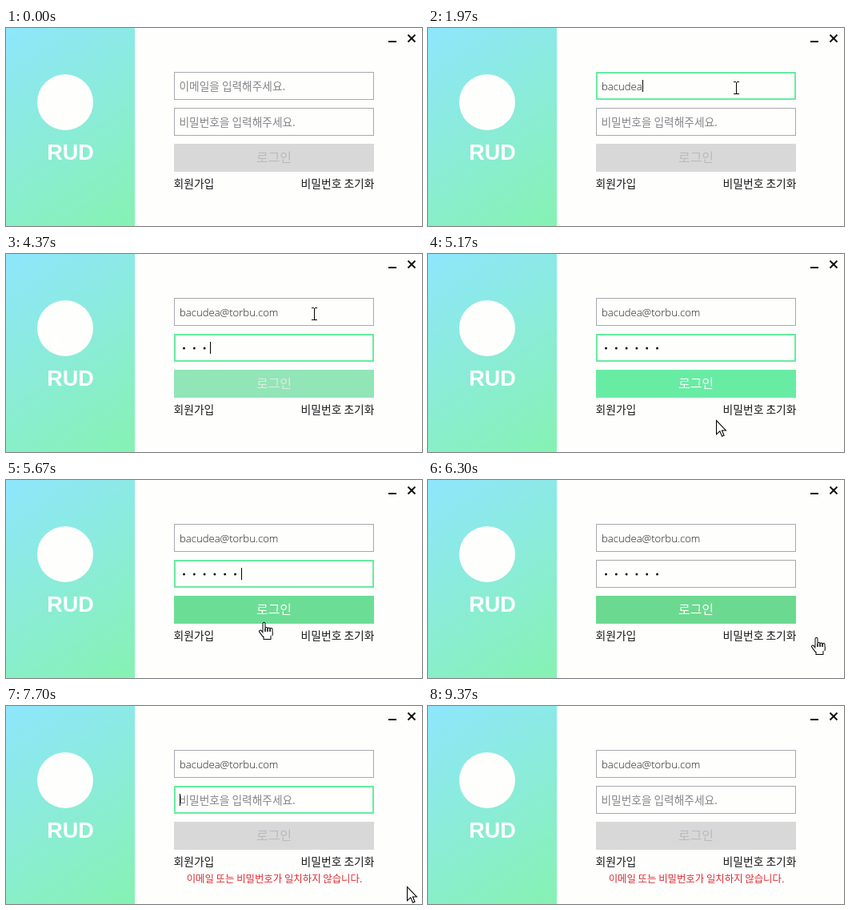
Write an HTML page with a canvas that moves like this. It is 520 by 248 pixels and loops after 9.41 s.

```html
<!DOCTYPE html>
<html lang="ko">
<head>
<meta charset="utf-8">
<style>
html, body { margin: 0; width: 520px; height: 248px; overflow: hidden; background: #fefefd; }
canvas { display: block; }
</style>
</head>
<body>
<canvas id="stage" width="520" height="248"></canvas>
<script>
const LOOP = 9410;
const ctx = document.getElementById('stage').getContext('2d');
const KO = '"Noto Sans CJK KR", "Noto Sans CJK", sans-serif';
const LATIN = '"Open Sans", "Noto Sans", sans-serif';
const EMAIL = 'bacudea@torbu.com';
const PAPER = '#fefefd', INK = '#1a1a1c';
const BLINK = 530;
const FOCUS_EMAIL = 470, FOCUS_PASS = 3340, SUBMIT = 6000, REPLY = 6630, LEAVE = 8900, BLUR = 9370;

const range = (n, start, step) => Array.from({ length: n }, (_, i) => start + i * step);
const emailKeys = [...range(6, 1400, 86), 1970, ...range(10, 2500, 80)];
const passKeys = range(6, 4200, 80);

// pointer legs: begin, end, and where each one arrives
const ENTRY = { x: 493, y: 187 };
const legs = [
  { from: 30, to: 470, x: 385, y: 75 },
  { from: 5000, to: 5170, x: 360, y: 208 },
  { from: 5170, to: 5300, x: 351, y: 217 },
  { from: 5300, to: 5830, x: 310, y: 161 },
  { from: 6200, to: 6300, x: 485, y: 197 },
  { from: 6300, to: 6470, x: 501, y: 226 }
];

const colors = {
  fill: { off: [216, 216, 217], on: [104, 236, 164], hover: [108, 217, 144] },
  text: { off: [186, 186, 190], on: [255, 255, 250], hover: [255, 255, 250] }
};

const clamp = v => Math.max(0, Math.min(1, v));
const mix = (a, b, k) => a + (b - a) * k;
const easeOut = (t, start, dur, power) => 1 - (1 - clamp((t - start) / dur)) ** power;
const blend = (a, b, k) => a.map((v, i) => mix(v, b[i], k));
const inside = (p, y) => p.x >= 210 && p.x < 460 && p.y >= y && p.y < y + 35;
const typedCount = (keys, t) => keys.filter(k => k <= t).length;

function text(str, x, y, size, color, align = 'left', family = KO) {
  ctx.font = `350 ${size}px ${family}`;
  ctx.textAlign = align;
  ctx.fillStyle = color;
  ctx.fillText(str, x, y);
}

function line(x0, y0, x1, y1, color, width) {
  ctx.beginPath();
  ctx.moveTo(x0, y0);
  ctx.lineTo(x1, y1);
  ctx.strokeStyle = color;
  ctx.lineWidth = width;
  ctx.stroke();
}

function dot(x, y, r, color) {
  ctx.beginPath();
  ctx.arc(x, y, r, 0, Math.PI * 2);
  ctx.fillStyle = color;
  ctx.fill();
}

function panel() {
  const g = ctx.createLinearGradient(0, 0, 161, 248);
  g.addColorStop(0, '#8ee6fc');
  g.addColorStop(1, '#86f2b2');
  ctx.fillStyle = g;
  ctx.fillRect(0, 0, 161, 248);
  dot(74, 93, 35, PAPER);
  ctx.font = 'bold 27px "Liberation Sans", Arial, sans-serif';
  ctx.textAlign = 'center';
  ctx.fillText('RUD', 80.5, 165);
}

function windowButtons() {
  ctx.fillStyle = '#111';
  ctx.fillRect(478, 16, 10, 2);
  line(502.5, 8.5, 511.5, 17.5, '#111', 2);
  line(511.5, 8.5, 502.5, 17.5, '#111', 2);
}

function field(y, focused, hint) {
  const width = focused ? 2 : 1;
  ctx.strokeStyle = focused ? '#66eca0' : '#a9a9ae';
  ctx.lineWidth = width;
  ctx.strokeRect(210 + width / 2, y + width / 2, 250 - width, 35 - width);
  if (hint) text(hint, 216.5, y + 23, 13.7, '#85858a');
}

// The caret restarts its blink at the latest key or focus time.
function caret(t, x, y, resets) {
  const last = Math.max(...resets.filter(k => k <= t));
  if (Math.floor((t - last) / BLINK) % 2) return;
  ctx.fillStyle = '#000';
  ctx.fillRect(Math.round(x), y, 1, 15);
}

function emailField(t) {
  const focused = t >= FOCUS_EMAIL && t < FOCUS_PASS;
  const typed = EMAIL.slice(0, typedCount(emailKeys, t));
  field(55, focused, typed ? '' : '이메일을 입력해주세요.');
  text(typed, 217, 78, 13.1, INK, 'left', LATIN);
  if (focused) caret(t, 217 + ctx.measureText(typed).width, 65, [FOCUS_EMAIL, ...emailKeys]);
}

function passField(t) {
  const focused = (t >= FOCUS_PASS && t < SUBMIT) || (t >= REPLY && t < BLUR);
  const count = t < REPLY ? typedCount(passKeys, t) : 0;
  field(100, focused, count ? '' : '비밀번호을 입력해주세요.');
  for (let i = 0; i < count; i++) dot(222.5 + i * 12.8, 118, 1.5, '#111');
  if (focused) caret(t, 217 + count * 12.8, 110, [FOCUS_PASS, ...passKeys, REPLY]);
}

function loginButton(t) {
  const shade = ({ off, on, hover }) => {
    const lit = blend(off, on, easeOut(t, passKeys[0], 430, 2));
    const hovered = blend(lit, hover, easeOut(t, 5500, 330, 2));
    const c = blend(hovered, off, easeOut(t, REPLY, 400, 4));
    return `rgb(${c.map(Math.round)})`;
  };
  ctx.fillStyle = shade(colors.fill);
  ctx.fillRect(210, 145, 250, 35);
  text('로그인', 335, 168, 16, shade(colors.text), 'center');
}

function pointerAt(t) {
  return legs.reduce((p, leg) => {
    const k = clamp((t - leg.from) / (leg.to - leg.from));
    return { x: mix(p.x, leg.x, k), y: mix(p.y, leg.y, k) };
  }, ENTRY);
}

function arrow() {
  ctx.scale(1.08, 1.08);
  ctx.fillStyle = '#fff';
  ctx.strokeStyle = '#000';
  ctx.lineWidth = 1;
  const outline = new Path2D('M.5 .5V16.5L4.5 12.8L7 18.8L9.3 17.8L6.9 12H11.5Z');
  ctx.fill(outline);
  ctx.stroke(outline);
}

function beam() {
  ctx.fillStyle = '#000';
  ctx.fillRect(0, -7, 1, 15);
  for (const y of [-8, 7]) {
    ctx.fillRect(-3, y, 3, 1);
    ctx.fillRect(1, y, 3, 1);
  }
}

function hand() {
  ctx.lineCap = 'round';
  for (const [color, edge] of [['#000', 1], ['#fff', 0]]) {
    const limb = (...ends) => line(...ends, color, 2 + 2 * edge);
    limb(0.5, 2, 0.5, 15);
    limb(-4, 11.5, 0, 17);
    for (let i = 1; i < 4; i++) limb(0.5 + 3 * i, 7.5 + i / 2, 0.5 + 3 * i, 15);
    ctx.fillStyle = color;
    ctx.fillRect(-0.5 - edge, 12, 11 + 2 * edge, 5);
    ctx.fillRect(0.5 - edge, 16, 8 + 2 * edge, 5 + edge);
  }
  ctx.lineCap = 'butt';
  for (let i = 0; i < 3; i++) line(2 + 3 * i, 8, 2 + 3 * i, 12, '#000', 1);
}

function pointer(t) {
  if (t < 30 || t >= LEAVE) return;
  const p = pointerAt(t);
  const busy = t >= SUBMIT && t < REPLY;
  const enabled = t >= passKeys[0] && t < REPLY;
  ctx.save();
  ctx.translate(Math.round(p.x), Math.round(p.y));
  if (busy || (enabled && inside(p, 145))) hand();
  else if (inside(p, 55) || inside(p, 100)) beam();
  else arrow();
  ctx.restore();
}

function draw(t) {
  ctx.fillStyle = PAPER;
  ctx.fillRect(0, 0, 520, 248);
  panel();
  windowButtons();
  emailField(t);
  passField(t);
  loginButton(t);
  text('회원가입', 209.5, 200, 13.8, INK);
  text('비밀번호 초기화', 460.5, 200, 13.8, INK, 'right');
  if (t >= REPLY) text('이메일 또는 비밀번호가 일치하지 않습니다.', 335.5, 221, 12.4, '#dc2c34', 'center');
  pointer(t);
}

const start = performance.now();
function tick() {
  draw((performance.now() - start) % LOOP);
  requestAnimationFrame(tick);
}
tick();
</script>
</body>
</html>
```
